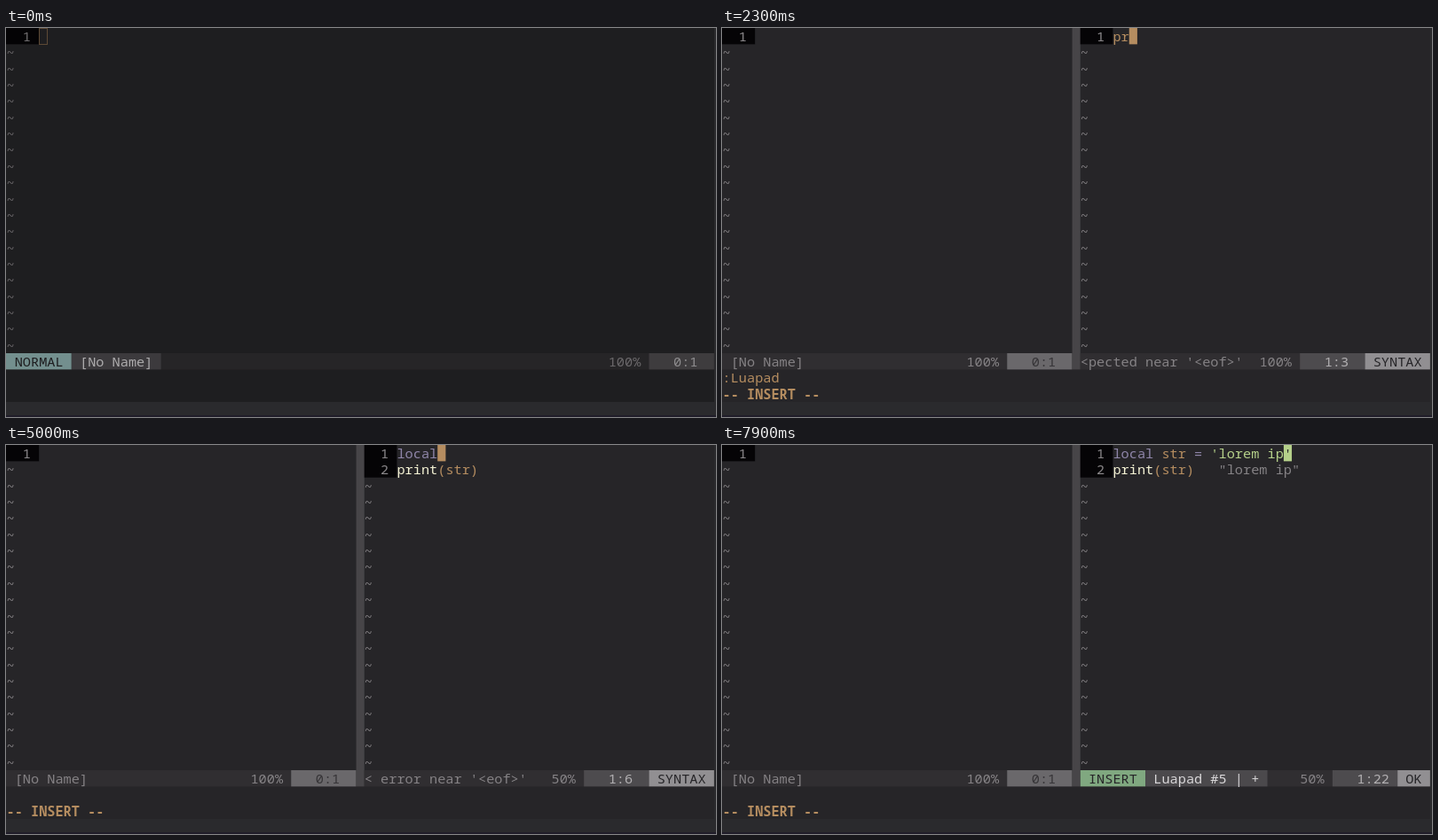
Write an HTML page that moves like this. It is 800 px wide and 439 px high and loops after 8000 ms.

```html
<!DOCTYPE html>
<html lang="en">
<head>
<meta charset="utf-8">
<title>Editor session</title>
<style>
html, body { margin: 0; width: 100%; height: 100%; overflow: hidden; background: #262528; }
svg { display: block; width: 800px; height: 439px; }
text { font: 15.275px "Noto Sans Mono", "DejaVu Sans Mono", monospace; white-space: pre; }
text.bold { font-weight: bold; }
</style>
</head>
<body>
<svg viewBox="0 0 800 439">
  <rect width="800" height="439" fill="#262528"/>
  <g id="screen"></g>
  <rect id="shade" width="798" height="422" fill="#000"/>
  <rect y="422" width="800" height="15" fill="#2a2a2d"/>
  <rect x="798" width="2" height="437" fill="#2a2a2d"/>
  <rect y="437" width="800" height="2" fill="#201d29"/>
</svg>
<script>
const LOOP = 8000, CELL = 9.165, ROW = 18.35, STATUS_ROW = 20;
const C = {
  bg: '#262528', gutter: '#050406', number: '#8b888b', tilde: '#838083', split: '#474548',
  bar: '#302e31', name: '#4b494c', bright: '#d8d6d8', dim: '#858285', position: '#4d4b4e',
  positionText: '#b2b0b2', idle: '#6a686b', idleText: '#363437', flag: '#918f92',
  tan: '#b58d60', call: '#f4f2d4', keyword: '#8f86a9', string: '#b5d08a', match: '#4d494b'
};
const MODES = { NORMAL: '#8fb3b1', COMMAND: '#86b0b3', INSERT: '#80a880' };
const screen = document.getElementById('screen');
const shade = document.getElementById('shade');

const left = col => 0.5 + col * CELL;
const escapeText = s => s.replace(/&/g, '&amp;').replace(/</g, '&lt;');
const box = (col, row, cols, fill, rows = 1) =>
  `<rect x="${(col ? left(col) : 0).toFixed(2)}" y="${(row * ROW).toFixed(2)}" width="${(cols * CELL + (col ? 0 : 0.5)).toFixed(2)}" height="${(rows * ROW).toFixed(2)}" fill="${fill}"/>`;
const label = (col, row, str, fill, cls = '') =>
  `<text class="${cls}" x="${left(col).toFixed(2)}" y="${(row * ROW + 15).toFixed(2)}" fill="${fill}">${escapeText(str)}</text>`;
const block = (col, row, str, bg, fill) => box(col, row, str.length, bg) + label(col, row, str, fill);

// Timeline: each entry changes part of the editor state.
const steps = [];
const at = (time, change) => steps.push([time, change]);
const type = (field, entries) => entries.forEach(([time, value]) => at(time, { [field]: value }));

at(0, { mode: 'NORMAL', focus: false, split: false, command: '', insertNote: false, before: '', after: '',
        second: '', echo: '', error: '', modified: false });
at(200, { focus: true });
at(550, { mode: 'COMMAND', command: ':' });
type('command', [[700, ':l'], [800, ':lu'], [950, ':lua'], [1080, ':luap'], [1300, ':Luapad']]);
at(1600, { mode: 'NORMAL', split: true });
at(1950, { mode: 'INSERT', insertNote: true });
at(2150, { before: 'p', modified: true, error: "<pected near '<eof>'" });
type('before', [[2280, 'pr'], [2400, 'pri'], [2500, 'prin'], [2600, 'print']]);
at(2880, { before: 'print(', after: ')', error: '', command: '', insertNote: false });
type('before', [[3080, 'print(s'], [3250, 'print(st'], [3400, 'print(str']]);
at(3800, { mode: 'NORMAL', before: 'print(st', after: 'r)' });
at(4200, { mode: 'INSERT', insertNote: true, before: '', after: '', second: 'print(str)' });
at(4500, { before: 'l', error: "<pected near 'print'" });
type('before', [[4600, 'lo'], [4700, 'loc'], [4800, 'loca']]);
at(4900, { before: 'local', error: "< error near '<eof>'" });
at(5100, { before: 'local ' });
at(5280, { before: 'local s', error: '' });
type('before', [[5400, 'local st'], [5580, 'local str'], [5780, 'local str '],
                [6000, 'local str ='], [6200, 'local str = ']]);
at(6450, { before: "local str = '", after: "'", echo: '""' });
[6700, 6800, 7000, 7200, 7400, 7600, 7700, 7880].forEach((time, i) => {
  const word = 'lorem ip'.slice(0, i + 1);
  at(time, { before: "local str = '" + word, echo: `"${word}"` });
});

function tokenColor(token) {
  if (token[0] === "'") return C.string;
  if (token === 'print') return C.call;
  if (token === 'local' || token === '=') return C.keyword;
  return C.tan;
}

function codeLine(col, row, source, cursor = -1) {
  const match = source[cursor] === ')' ? source.indexOf('(') : -1;
  let out = match >= 0 ? box(col + match, row, 1, C.match) : '';
  let under = C.tan;
  const trailing = source.trimEnd().length;
  for (const { 0: token, index } of source.matchAll(/'[^']*'|\w+|[^\w\s]/g)) {
    const fill = tokenColor(token);
    if (cursor >= index && cursor < index + token.length) under = fill;
    out += label(col + index, row, token, fill);
  }
  if (trailing < source.length) out += label(col + trailing, row, '·', C.tan);
  if (cursor >= 0) {
    out += box(col + cursor, row, 1, under);
    if (source[cursor]) out += label(col + cursor, row, source[cursor], C.bg);
  }
  return out;
}

function gutter(col, lines) {
  let out = box(col, 0, 4, C.gutter, lines);
  for (let row = 0; row < STATUS_ROW; row++) {
    out += row < lines ? label(col + 2, row, String(row + 1), C.number) : label(col, row, '~', C.tilde);
  }
  return out;
}

// Right-aligned end of a status bar: percentage, position, optional flag.
function statusEnd(end, percent, position, bg, fill, flag = '') {
  const flagText = flag && ` ${flag} `;
  const edge = end - flagText.length;
  return label(edge - 9 - percent.length, STATUS_ROW, percent, C.dim) +
    block(edge - 8, STATUS_ROW, `   ${position.padEnd(4)} `, bg, fill) +
    (flag ? block(edge, STATUS_ROW, flagText, C.flag, C.bg) : '');
}

function statusStart(col, mode, name) {
  const modeText = ` ${mode} `;
  return block(col, STATUS_ROW, modeText, MODES[mode], C.bg) +
    block(col + modeText.length, STATUS_ROW, ` ${name} `, C.name, C.bright);
}

function scratchWindow(s) {
  const column = s.before.length + 1;
  const empty = !s.before && !s.after && !s.second;
  const name = 'Luapad #5' + (s.modified ? ' | +' : '');
  return box(43, 0, 1, C.split, 21) + box(44, STATUS_ROW, 43, C.bar) +
    gutter(44, s.second ? 2 : 1) +
    codeLine(48, 0, s.before + s.after, s.before.length) +
    codeLine(48, 1, s.second) +
    label(61, 1, s.echo, C.dim) +
    (s.error ? label(44, STATUS_ROW, s.error, C.dim) : statusStart(44, s.mode, name)) +
    statusEnd(87, s.second ? '50%' : '100%', empty ? '0:1' : '1:' + column,
              C.position, C.positionText, s.error ? 'SYNTAX' : 'OK');
}

function emptyWindow(s) {
  const base = gutter(0, 1) + box(0, STATUS_ROW, s.split ? 43 : 87, C.bar);
  if (s.split) {
    return base + label(1, STATUS_ROW, '[No Name]', C.dim) + statusEnd(43, '100%', '0:1', C.idle, C.idleText);
  }
  let cursor = '';
  if (s.mode === 'NORMAL') {
    cursor = s.focus ? box(4, 0, 1, C.tan)
      : `<rect x="37.5" y=".5" width="9" height="18" fill="none" stroke="#745b42"/>`;
  }
  return base + cursor + statusStart(0, s.mode, '[No Name]') +
    statusEnd(87, '100%', '0:1', C.position, C.positionText);
}

function draw(s) {
  screen.innerHTML = emptyWindow(s) + (s.split ? scratchWindow(s) : '') +
    label(0, 21, s.command, C.tan) +
    (s.mode === 'COMMAND' ? box(s.command.length, 21, 1, C.tan) : '') +
    (s.insertNote ? label(0, 22, '-- INSERT --', C.tan, 'bold') : '');
}

let shown = -1;
function render(time) {
  const done = steps.filter(([start]) => start <= time);
  if (done.length !== shown) {
    shown = done.length;
    draw(Object.assign({}, ...done.map(([, change]) => change)));
  }
  const fade = Math.min(1, Math.max(0, (time - 50) / 300));
  shade.setAttribute('opacity', (0.2 * (1 - fade)).toFixed(3));
}

const origin = performance.now();
function tick() {
  render((performance.now() - origin) % LOOP);
  requestAnimationFrame(tick);
}
tick();
</script>
</body>
</html>
```
